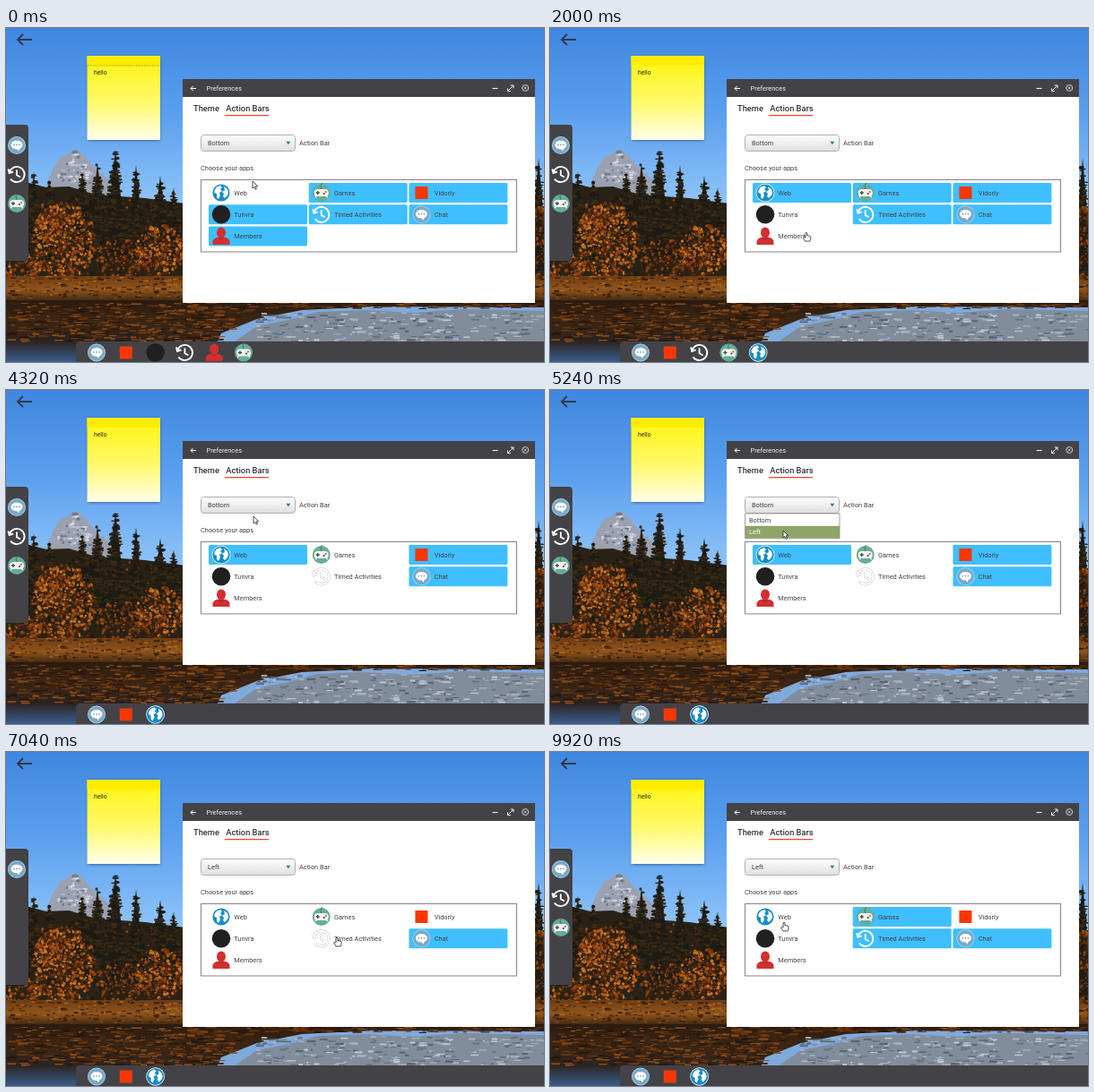
An HTML page with a canvas for the animation above (9.96 s loop, 600x373 px).

```html
<!DOCTYPE html>
<html lang="en">
<head>
<meta charset="utf-8">
<title>Action bar preferences</title>
<style>
html, body { margin: 0; width: 100%; height: 100%; overflow: hidden; background: #434247; }
canvas { display: block; width: 600px; height: 373px; }
</style>
</head>
<body>
<canvas id="stage"></canvas>
<script>
const W = 600, H = 373, LOOP = 9960;
const canvas = document.getElementById('stage');
const scale = window.devicePixelRatio || 1;
canvas.width = W * scale;
canvas.height = H * scale;
let ctx = canvas.getContext('2d');

const DARK = '#434247', TILE = '#3fbfff', INK = '#3f4145', GLOBE = '#168cc5';

const apps = [
  ['web', 'Web'], ['games', 'Games'], ['video', 'Vidorly'],
  ['music', 'Tunvra'], ['timed', 'Timed Activities'], ['chat', 'Chat'],
  ['members', 'Members']
];

const bars = {
  Bottom: {
    start: ['chat', 'video', 'music', 'timed', 'members', 'games'],
    clicks: [[440, 'web'], [1200, 'music'], [1760, 'members'], [2560, 'timed'], [3320, 'games']]
  },
  Left: {
    start: ['chat', 'timed', 'games'],
    clicks: [[6280, 'games'], [6840, 'timed'], [7560, 'timed'], [8360, 'games']]
  }
};
const MENU_OPEN = 4720, MENU_PICK = 5560;

// time, x, y of the pointer's hot spot
const pointerPath = [
  [0, 275, 171], [360, 267, 182], [560, 267, 182], [1000, 274, 207], [1280, 274, 207],
  [1680, 271, 231], [1880, 271, 231], [2440, 394, 207], [2640, 394, 207], [2960, 404, 196],
  [3200, 402, 184], [3440, 402, 184], [4200, 276, 141], [4360, 276, 141], [4640, 300, 128],
  [4800, 300, 128], [5200, 260, 157], [5640, 260, 157], [6160, 374, 184], [6360, 374, 184],
  [6720, 369, 207], [7640, 369, 207], [8240, 376, 184], [8640, 376, 184], [9600, 261, 190],
  [9960, 261, 190]
];

function fillRect(x, y, w, h, color) {
  ctx.fillStyle = color;
  ctx.fillRect(x, y, w, h);
}

function ellipse(x, y, rx, ry, color) {
  ctx.fillStyle = color;
  ctx.beginPath();
  ctx.ellipse(x, y, rx, ry, 0, 0, Math.PI * 2);
  ctx.fill();
}

function disc(x, y, r, color) {
  ellipse(x, y, r, r, color);
}

function roundBox(x, y, w, h, radii, fill, line) {
  ctx.beginPath();
  ctx.roundRect(x, y, w, h, radii);
  ctx.fillStyle = fill;
  ctx.fill();
  if (line) {
    ctx.strokeStyle = line;
    ctx.lineWidth = 1;
    ctx.stroke();
  }
}

function stroke(path, color, width) {
  ctx.strokeStyle = color;
  ctx.lineWidth = width;
  ctx.stroke(new Path2D(path));
}

function shape(path, color) {
  ctx.fillStyle = color;
  ctx.fill(new Path2D(path));
}

function text(label, x, y, size = 7.4, color = INK, weight = 400) {
  ctx.font = `${weight} ${size}px Roboto, sans-serif`;
  ctx.fillStyle = color;
  ctx.fillText(label, x, y);
}

function vertical(y0, y1, ...colors) {
  const g = ctx.createLinearGradient(0, y0, 0, y1);
  colors.forEach((c, i) => g.addColorStop(i / (colors.length - 1), c));
  return g;
}

function randomSource(seed) {
  return () => (seed = (seed * 16807) % 2147483647) / 2147483647;
}

const random = randomSource(4711);
const pick = list => list[Math.floor(random() * list.length)];

// Scatters leaf dabs inside an ellipse.
function foliage(x, y, rx, ry, count, colors) {
  for (let i = 0; i < count; i++) {
    const a = random() * Math.PI * 2, d = Math.sqrt(random());
    disc(x + Math.cos(a) * d * rx, y + Math.sin(a) * d * ry, 0.6 + random() * 1.5, pick(colors));
  }
}

// A cone of drooping branches, widest at its foot.
function conifer(x, top, foot, halfWidth, colors) {
  shape(`M${x} ${top} L${x + halfWidth * 0.8} ${foot} H${x - halfWidth * 0.8}Z`, colors[0]);
  for (let i = 0; i < (foot - top) * 3; i++) {
    const k = Math.sqrt(random());
    const reach = halfWidth * (0.1 + 0.9 * k) * (random() * 2 - 1);
    ellipse(x + reach, top + (foot - top) * k, 1.2 + random() * 2.2, 0.7 + random(), pick(colors));
  }
}

function paintLandscape() {
  const autumn = ['#8e4210', '#b05a14', '#6c300c', '#c57426', '#4a250d'];
  const pines = ['#201c14', '#2c2517', '#191a15', '#3c2a14'];
  const rust = ['#5e2d0d', '#7c3d10', '#3a200f', '#251a11', '#954c13'];

  fillRect(0, 0, W, 275, vertical(0, 190, '#3f87df', '#5a9fee', '#8cc2f8'));

  shape('M42 184 L52 158 L62 143 L70 140 L77 135 L86 141 L97 154 L124 178 V200 H42Z', '#9ba1b0');
  for (let i = 0; i < 60; i++) {
    const k = random(), x = 77 + (random() - 0.5) * 55 * k;
    ellipse(x, 138 + k * 36, 1 + random() * 2.5, 0.8 + random(), pick(['#d6dae3', '#717a8c', '#b6bbc7']));
  }

  shape('M0 166 L22 172 L45 178 L70 177 L100 186 L155 190 L200 196 V285 H0Z', '#2a2116');
  foliage(100, 232, 105, 45, 700, [...pines, ...rust]);
  for (const [x, top, width] of [[31, 160, 11], [48, 169, 11], [85, 161, 14], [102, 151, 15],
    [145, 153, 13], [122, 136, 17], [187, 178, 12], [172, 165, 14]]) {
    conifer(x, top, 258, width, pines);
  }
  foliage(64, 238, 36, 43, 600, autumn);
  foliage(48, 222, 15, 18, 110, autumn);
  foliage(12, 268, 26, 18, 170, autumn);
  foliage(128, 257, 30, 21, 230, rust);
  foliage(172, 248, 27, 28, 320, autumn);
  conifer(594, 145, 290, 15, pines);
  foliage(595, 235, 10, 50, 160, rust);

  fillRect(0, 277, W, 30, vertical(277, 307, '#6d3b12', '#92551b', '#32200f'));
  for (let i = 0; i < 700; i++) {
    fillRect(random() * W, 274 + random() * 27, 1.5 + random() * 5, 0.7 + random() * 1.5,
      pick(['#a86625', '#522b0e', '#784213', '#2f1d0f']));
  }

  fillRect(0, 304, W, 69, vertical(304, 373, '#2a1b10', '#3d2613', '#2b2320', '#3b5d8c'));
  shape('M225 373 L240 341 L280 325 L330 315 L410 311 L600 312 V373Z', '#7faade');
  shape('M255 350 L280 333 L315 326 L348 317 L400 315 L455 318 L510 314 L600 316 V373 H255Z', '#828d9c');
  for (let i = 0; i < 300; i++) {
    fillRect(275 + random() * 325, 317 + random() * 32, 2 + random() * 8, 0.8 + random() * 1.5,
      pick(['#a7b0bc', '#69727e', '#566474', '#bdc5cf', '#7e8da2']));
  }
  for (let i = 0; i < 650; i++) {
    const y = 307 + random() * 42;
    fillRect(random() * (275 - (y - 307) * 0.9), y, 3 + random() * 9, 0.7 + random() * 1.3,
      pick(['#693610', '#8c4b16', '#23170f', '#3a2312']));
  }
  for (let i = 0; i < 150; i++) {
    fillRect(200 + random() * 400, 305 + random() * 8, 3 + random() * 10, 1, pick(rust));
  }
}

const landscape = document.createElement('canvas');
landscape.width = canvas.width;
landscape.height = canvas.height;
const screenCtx = ctx;
ctx = landscape.getContext('2d');
ctx.scale(scale, scale);
paintLandscape();
ctx = screenCtx;
ctx.scale(scale, scale);

const icons = {
  web() {
    disc(0, 0, 10.3, '#fff');
    disc(0, 0, 9.6, GLOBE);
    shape('M-7.5 -3 L-5 -6.5 L-1 -8 L1 -6 L-1 -4 L1 -2 L-2 0 L-1 3 L-3 7 L-5 5 L-5 1 L-7.5 0Z', '#fff');
    shape('M3 -7 L7 -4 L8 0 L7 3 L4 6 L2 4 L3 1 L1 -1 L4 -3Z', '#fff');
  },
  games() {
    disc(0, 0, 10, '#66ad9b');
    roundBox(-8, -4, 16, 8, 4, '#f4f4ed');
    shape('M-7 0 L-3 2 L-7 6Z M7 0 L3 2 L7 6Z', '#f4f4ed');
    stroke('M-6 0 H-2 M-4 -2 V2', '#414b4b', 1.3);
    disc(3, 1, 1.1, '#414b4b');
    disc(5, -1, 1.1, '#c85b49');
    stroke('M0 -4 Q-2 -8 1 -11', '#42695f', 0.9);
  },
  video() {
    fillRect(-7, -7, 14, 14, '#f63800');
  },
  music() {
    disc(0, 0, 10.3, '#211f21');
  },
  timed(onWhite) {
    const ring = 'M-8 -3 A8.6 8.6 0 1 1 -7 5 M-9.5 -6 L-8.3 -1.5 L-4 -3 M0 -5 V0.7 L4 3';
    if (onWhite) stroke(ring, '#c4c4c4', 2.9);
    stroke(ring, '#fff', 1.9);
  },
  chat() {
    disc(0, 0, 10, '#b2d2e1');
    disc(0, 0, 9.2, '#78aac8');
    ellipse(0, -0.5, 6.5, 4.8, '#fff');
    shape('M-1 2 L4 2 L2 6.5Z', '#fff');
    for (const x of [-3, 0, 3]) disc(x, -0.5, 0.8, '#6d7c85');
  },
  members() {
    shape('M-9.5 9.5 V6 Q-9 2 -3 1 H3 Q9 2 9.5 6 V9.5Z', '#d12f30');
    ellipse(0, -4, 5, 6, '#d12f30');
    stroke('M-3 2 Q0 5 3 2', '#9f2427', 0.8);
  }
};

function icon(id, x, y, onWhite = false) {
  ctx.save();
  ctx.translate(x, y);
  icons[id](onWhite);
  ctx.restore();
}

function barApps(name, t) {
  let list = [...bars[name].start];
  for (const [time, id] of bars[name].clicks) {
    if (t < time) break;
    list = list.includes(id) ? list.filter(other => other !== id) : [...list, id];
  }
  return list;
}

function pointerAt(t) {
  const next = Math.max(1, pointerPath.findIndex(p => p[0] > t));
  const [t0, x0, y0] = pointerPath[next - 1];
  const [t1, x1, y1] = pointerPath[next];
  const k = (t - t0) / (t1 - t0), e = k * k * (3 - 2 * k);
  return [x0 + (x1 - x0) * e, y0 + (y1 - y0) * e];
}

function drawNote(t) {
  ctx.save();
  ctx.shadowColor = '#0006';
  ctx.shadowBlur = 3 * scale;
  ctx.shadowOffsetY = scale;
  fillRect(90.5, 31, 81.5, 94, vertical(41, 125, '#fff51c', '#fff96a', '#fffeea'));
  ctx.restore();
  fillRect(90.5, 31, 81.5, 10.5, '#ffec00');
  if (t < 40) {
    ctx.setLineDash([2, 1]);
    stroke('M90.5 42 H172', '#8c8940', 0.7);
    ctx.setLineDash([]);
  }
  text('hello', 98, 52.2, 6.8, '#222');
}

function drawWindow() {
  fillRect(197, 57, 393, 250, '#fff');
  fillRect(197, 57, 393, 20, DARK);
  stroke('M206 67.5 H212 M208.7 64.8 L206 67.5 L208.7 70.2', '#fff', 1);
  text('Preferences', 223.5, 69.8, 7.4, '#f2f2f2');
  stroke('M542.5 67.5 H548.5', '#eee', 1.1);
  stroke('M560 70 L565.5 64.5 M562.7 64 H566 V67.3 M559.5 67.3 V70.6 H562.8', '#eee', 1);
  stroke('M582.7 67 A3.5 3.5 0 1 1 575.7 67 A3.5 3.5 0 1 1 582.7 67 M577.8 65.6 L580.6 68.4 M580.6 65.6 L577.8 68.4', '#eee', 0.8);
  text('Theme', 209, 93, 9.3, '#303236', 500);
  text('Action Bars', 245.3, 93, 9.3, '#303236', 500);
  fillRect(244, 97, 49, 1.3, '#ee4a32');
}

function drawCombo(mode) {
  roundBox(217.5, 119.5, 105, 18, 3, vertical(119, 138, '#fff', '#dedede'), '#b0b0b0');
  text(mode, 225, 131.1);
  shape('M312.3 126.7 H317.3 L314.8 130.3Z', '#267ba8');
  text('Action Bar', 327, 131.1);
  text('Choose your apps', 217, 158.8);
}

function drawTiles(selected) {
  ctx.strokeStyle = '#858585';
  ctx.lineWidth = 1;
  ctx.strokeRect(217.5, 169.5, 352, 80.5);
  apps.forEach(([id, label], i) => {
    const x = 226 + (i % 3) * 111.7, y = 173 + Math.floor(i / 3) * 24.3;
    const on = selected.includes(id);
    if (on) roundBox(x, y, 110, 22, 1.5, TILE);
    icon(id, x + 14, y + 11, !on);
    text(label, x + 28.3, y + 13.6);
  });
}

function drawMenu(pointerY) {
  const row = pointerY > 151.5 ? 1 : 0;
  fillRect(217.5, 138, 105.5, 28, '#fff');
  fillRect(218, 138 + row * 13.8, 105, 13.8, '#8fa568');
  ctx.strokeStyle = '#8c8c8c';
  ctx.lineWidth = 0.8;
  ctx.strokeRect(217.5, 138, 105.5, 27.8);
  ['Bottom', 'Left'].forEach((label, i) =>
    text(label, 222, 147.5 + i * 13.7, 7.4, i === row ? '#fff' : INK));
}

function drawPointer(x, y) {
  const hand = y > 172 && y < 250;
  const outline = hand
    ? 'M-1 1 Q0 -1 1 1 V4 L2 3.5 L3 4.2 L4 4 L5 5 V8 L4 10 H-1 L-3.5 6 Q-3 4.5 -1 6Z'
    : 'M0 0 V8 L1.8 6.4 L3.1 9.2 L4.5 8.5 L3.2 5.8 H5.6Z';
  ctx.save();
  ctx.translate(x, y);
  ctx.lineJoin = 'round';
  shape(outline, '#fff');
  stroke(outline, '#222', 0.8);
  ctx.restore();
}

function render(t) {
  const mode = t < MENU_PICK ? 'Bottom' : 'Left';
  const lists = { Bottom: barApps('Bottom', t), Left: barApps('Left', t) };
  const [px, py] = pointerAt(t);

  ctx.drawImage(landscape, 0, 0, W, H);
  stroke('M13 13 H29 M19 7 L13 13 L19 19', '#303a47', 1.8);
  drawNote(t);
  roundBox(-5, 108, 30, 152, 4, DARK);
  roundBox(78, 350, 530, 30, 4, DARK);
  lists.Left.forEach((id, i) => icon(id, 12, 131 + i * 32.5));
  lists.Bottom.forEach((id, i) => icon(id, 101 + i * 32.8, 362.5));
  drawWindow();
  drawCombo(mode);
  drawTiles(lists[mode]);
  if (t >= MENU_OPEN && t < MENU_PICK) drawMenu(py);
  drawPointer(px, py);
}

const began = performance.now();
function tick() {
  render((performance.now() - began) % LOOP);
  requestAnimationFrame(tick);
}
tick();
</script>
</body>
</html>
```
